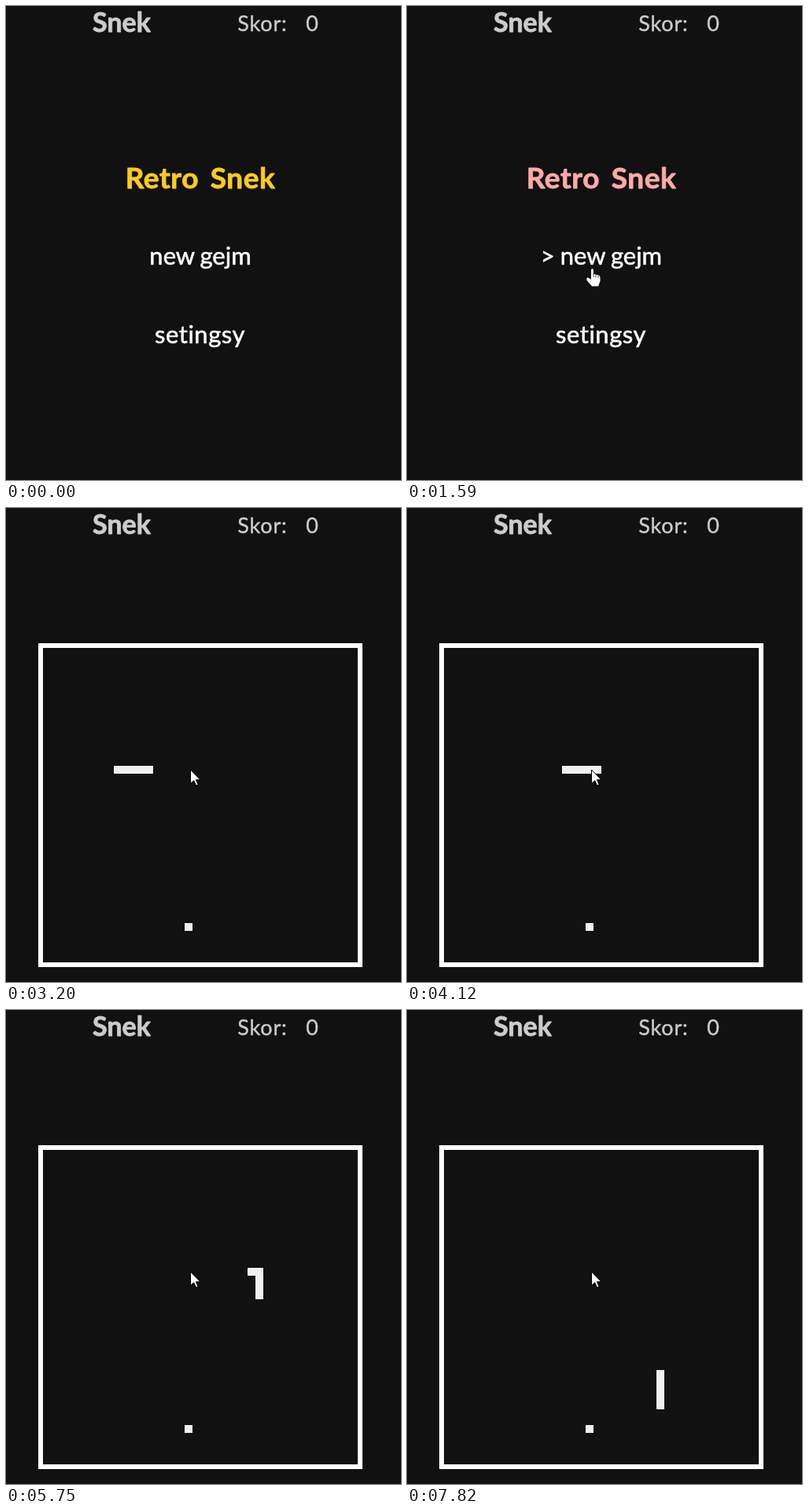
Write an HTML page that moves like this. It is 502 px wide and 603 px high and loops after 8 s.

```html
<!DOCTYPE html>
<html lang="pl">
<head>
<meta charset="utf-8">
<title>Snek</title>
<style>
  html, body { margin: 0; width: 100%; height: 100%; overflow: hidden; background: #111; }
  svg { display: block; width: 502px; height: 603px; }
  text {
    font-family: Lato, "Open Sans", sans-serif; text-anchor: middle; white-space: pre;
    fill: currentColor; stroke: currentColor; stroke-width: .6; stroke-linejoin: round; color: #fff;
  }
  .bar { color: #ccc; stroke-width: .4; }
  .bold { font-weight: 700; stroke-width: .8; }
  .item { font-size: 31px; word-spacing: -1px; }
  #title { font-size: 37px; letter-spacing: .6px; word-spacing: 5px; }
  #arrow { fill: #fff; stroke: #000; }
  #snake, #food { fill: #f0f0f0; shape-rendering: crispEdges; }
</style>
</head>
<body>
<svg viewBox="0 0 502 603">
  <rect width="502" height="603" fill="#111"/>
  <text class="bar bold" x="147" y="33" font-size="34">Snek</text>
  <text class="bar" x="326" y="32" font-size="27" letter-spacing=".8">Skor:</text>
  <text class="bar" x="389" y="32" font-size="27">0</text>

  <g id="menu">
    <text id="title" class="bold" x="247" y="232">Retro Snek</text>
    <text id="play" class="item" x="247" y="329"></text>
    <text class="item" x="246.5" y="429" letter-spacing=".5">setingsy</text>
  </g>

  <g id="game">
    <rect x="44" y="175" width="406" height="406" fill="none" stroke="#fff" stroke-width="6"/>
    <rect id="food" x="227" y="528" width="10" height="10"/>
    <path id="snake"/>
  </g>

  <path id="arrow" d="M-.5-1V16.5L3.7 12.8 6.5 19 9.2 17.8 6.5 11.8H12Z"/>
  <g id="hand">
    <path fill="#fff" d="M-1 1.5Q.5-1 2 1.5V7L8.5 8.5Q10.5 9 10.5 11.5V16L8 22.5H0L-6 15.5Q-8 12-5 11.5L-1 14Z"/>
    <path d="M2 7V11M5 8V11M8 9V12" stroke="#000" stroke-width=".7"/>
  </g>
</svg>
<script>
const LOOP = 8000, CELL = 10, LEFT = 47, TOP = 178;
const GAME_STEP = 9, TURN_COLUMN = 27, SNAKE_ROW = 15, SNAKE_LENGTH = 5;
const delays = [220, 220, 230, 220, 220, 250, ...Array(14).fill(230), 250, ...Array(14).fill(230)];
const el = id => document.getElementById(id);
const show = (id, on) => el(id).style.display = on ? "" : "none";

function stepAt(time) {
  let step = 0;
  while (step < delays.length - 1 && time >= delays[step]) time -= delays[step++];
  return step;
}

function titleColor(step) {
  const [from, to, mix] = step < 4
    ? [[255, 204, 26], [255, 252, 108], step / 4]
    : [[255, 252, 108], [255, 170, 168], (step - 4) / 3];
  return `rgb(${from.map((v, i) => Math.round(v + (to[i] - v) * mix))})`;
}

function snakePath(step) {
  const head = 7 + Math.floor(1.54 * (step - 10) + 0.25);
  let d = "";
  for (let i = head - SNAKE_LENGTH + 1; i <= head; i++) {
    const x = LEFT + CELL * Math.min(i, TURN_COLUMN);
    const y = TOP + CELL * (SNAKE_ROW + Math.max(0, i - TURN_COLUMN));
    d += `M${x} ${y}h${CELL}v${CELL}h-${CELL}z`;
  }
  return d;
}

function pointerAt(step) {
  if (step === 3) return [365, 207];
  if (step === 4) return [258, 257];
  if (step === 5) return [236, 339];
  return [235, 334];
}

function draw(step) {
  const playing = step >= GAME_STEP;
  const hover = step >= 5 && !playing;
  show("menu", !playing);
  show("game", playing);
  show("hand", hover);
  show("arrow", step >= 3 && !hover);
  const move = `translate(${pointerAt(step)})`;
  el("arrow").setAttribute("transform", move);
  el("hand").setAttribute("transform", move);
  el("title").style.color = titleColor(step);
  el("play").textContent = hover ? "> new gejm" : "new gejm";
  if (playing) el("snake").setAttribute("d", snakePath(step));
}

const start = performance.now();
function tick() {
  draw(stepAt((performance.now() - start) % LOOP));
  requestAnimationFrame(tick);
}
tick();
</script>
</body>
</html>
```
